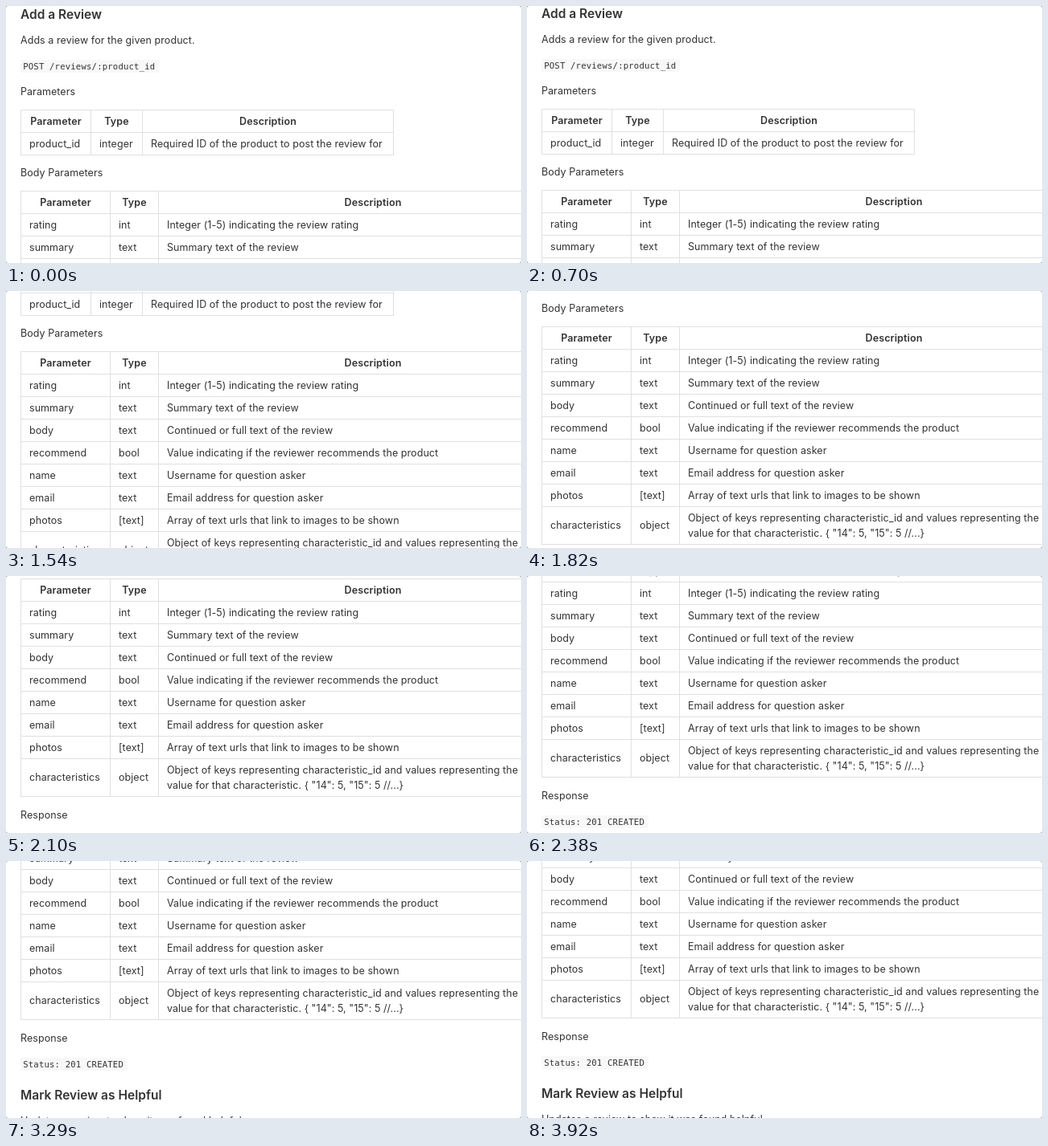
These frames come from a looping animation (640 px wide and 320 px high, 4.27 s). An HTML page:

```html
<!DOCTYPE html>
<html lang="en">
<head>
<meta charset="utf-8">
<title>API docs</title>
<style>
  html, body { margin: 0; width: 100%; height: 100%; overflow: hidden; background: #fff; }
  svg { display: block; width: 100vw; height: 100vh; }
  text { font: 12.5px Inter, "Open Sans", sans-serif; fill: #333; letter-spacing: .06px; white-space: pre; }
  .th { font-weight: 600; text-anchor: middle; letter-spacing: .12px; }
  .h { font-size: 15.5px; font-weight: 600; letter-spacing: 0; }
  .code { font: 10.6px "DejaVu Sans Mono", monospace; letter-spacing: .19px; }
  .chip { fill: #f8f8f8; }
  .rule { fill: none; stroke: #dfe0e2; shape-rendering: crispEdges; }
</style>
</head>
<body>
<svg viewBox="0 0 640 320">
  <g id="page"></g>
  <path fill="#a4a4a4" fill-rule="evenodd" d="M0 0H640V320H0ZM3 0A3 3 0 0 0 0 3V317A3 3 0 0 0 3 320H637A3 3 0 0 0 640 317V3A3 3 0 0 0 637 0Z"/>
</svg>
<script>
const LOOP = 4270, STEP = 70;
const page = document.getElementById('page');

function add(tag, attrs, content = '') {
  const el = document.createElementNS('http://www.w3.org/2000/svg', tag);
  for (const key in attrs) el.setAttribute(key, attrs[key]);
  el.textContent = content;
  page.appendChild(el);
}

const text = (x, y, content, cls = 'p') => add('text', { x, y, class: cls }, content);

function code(y, content) {
  add('rect', { x: 18, y: y - 12, width: 8 + content.length * 6.57, height: 16, rx: 2, class: 'chip' });
  text(21.2, y, content, 'code');
}

// cols: vertical rule positions; a cell holding an array is set on several lines
function table(top, cols, rows) {
  const left = cols[0], right = cols[cols.length - 1];
  let y = top, d = `M${left} ${y + .5}H${right + 1}`;
  rows.forEach((row, r) => {
    const height = row.some(Array.isArray) ? 47 : 28;
    row.forEach((cell, c) => {
      const lines = [].concat(cell);
      const base = y + height / 2 + 5 - (lines.length - 1) * 9.5;
      lines.forEach((line, i) => {
        const ly = Math.floor(base + i * 19);
        if (r) text(cols[c] + 11, ly, line);
        else text((cols[c] + cols[c + 1] + 1) / 2, ly, line, 'th');
      });
    });
    y += height;
    d += `M${left} ${y + .5}H${right + 1}`;
  });
  for (const x of cols) d += `M${x + .5} ${top}V${y + 1}`;
  add('path', { d, class: 'rule' });
}

const head = ['Parameter', 'Type', 'Description'];

text(18, 16, 'Add a Review', 'h');
text(18, 47, 'Adds a review for the given product.');
code(79, 'POST /reviews/:product_id');
text(18, 111, 'Parameters');
table(129, [18, 105, 169, 481], [
  head,
  ['product_id', 'integer', 'Required ID of the product to post the review for']
]);
text(18, 212, 'Body Parameters');
table(230, [18, 129, 189, 722], [
  head,
  ['rating', 'int', 'Integer (1-5) indicating the review rating'],
  ['summary', 'text', 'Summary text of the review'],
  ['body', 'text', 'Continued or full text of the review'],
  ['recommend', 'bool', 'Value indicating if the reviewer recommends the product'],
  ['name', 'text', 'Username for question asker'],
  ['email', 'text', 'Email address for question asker'],
  ['photos', '[text]', 'Array of text urls that link to images to be shown'],
  ['characteristics', 'object', [
    'Object of keys representing characteristic_id and values representing the',
    'value for that characteristic. { "14": 5, "15": 5 //...}'
  ]]
]);
text(18, 529, 'Response');
code(561, 'Status: 201 CREATED');
text(18, 601, 'Mark Review as Helpful', 'h');
text(18, 632, 'Updates a review to show it was found helpful.');

// scroll position over time: [ms, px]
const keys = [[0, 0], [630, 0], [700, 1], [1190, 110], [1820, 186], [2380, 251],
  [2660, 251], [3010, 282], [3360, 306], [LOOP, 306]];
const slope = i => keys[i + 1]
  ? (keys[i + 1][1] - keys[i][1]) / (keys[i + 1][0] - keys[i][0]) : 0;
const tangents = keys.map((_, i) => {
  const a = i ? slope(i - 1) : 0, b = slope(i);
  return a * b > 0 ? 2 * a * b / (a + b) : 0;
});

// monotone cubic through the keys
function scrollAt(t) {
  let i = 0;
  while (i < keys.length - 2 && t >= keys[i + 1][0]) i++;
  const [t0, y0] = keys[i], [t1, y1] = keys[i + 1];
  const span = t1 - t0, u = (t - t0) / span, v = 1 - u;
  return y0 + (y1 - y0) * u * u * (3 - 2 * u)
    + span * u * v * (tangents[i] * v - tangents[i + 1] * u);
}

function draw(now) {
  const t = Math.floor((now % LOOP) / STEP) * STEP;
  page.setAttribute('transform', `translate(0 ${-Math.round(scrollAt(t))})`);
}

const start = performance.now();
function tick() {
  draw(performance.now() - start);
  requestAnimationFrame(tick);
}
tick();
</script>
</body>
</html>
```
